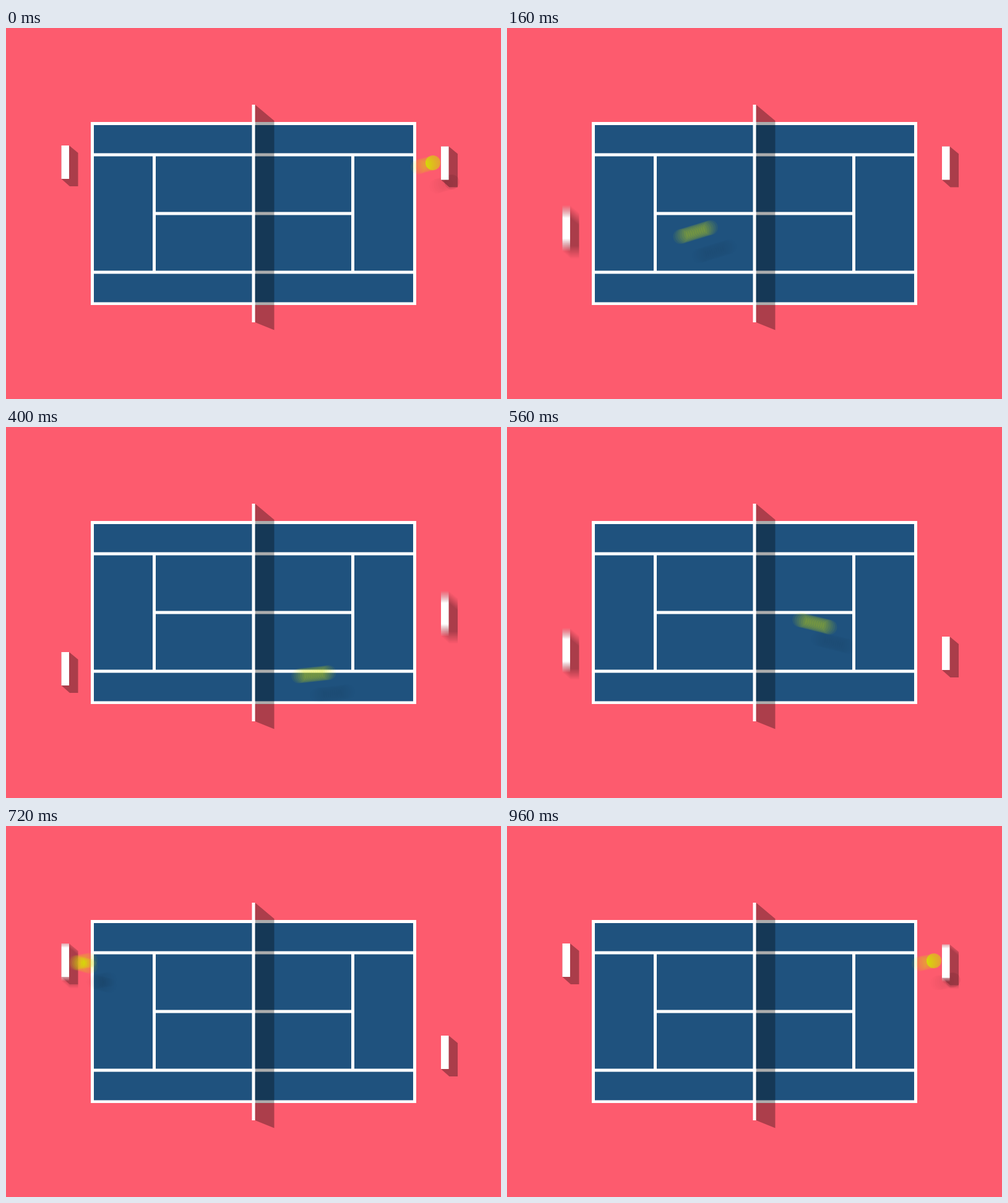
Animation of 800x600 px, one loop 1000 ms. Source, as an HTML page with a canvas:

```html
<!DOCTYPE html>
<html>
<head>
<meta charset="utf-8">
<style>
  html, body { margin: 0; width: 100%; height: 100%; overflow: hidden; background: #fd5b6e; }
  canvas { display: block; }
</style>
</head>
<body>
<canvas id="stage" width="800" height="600"></canvas>
<script>
const ctx = document.getElementById('stage').getContext('2d');
const layer = document.createElement('canvas');
layer.width = 800;
layer.height = 600;
const lctx = layer.getContext('2d');

const LOOP = 1000, STEP = 40, LEG = 240, END = 960;
const SHUTTER = 20, SAMPLES = 15;
const SHADOW = 0.32, BALL_SHADOW = 0.14;
const RIGHT_X = 690, LEFT_X = 112;

// Ball flights: start y, end y, start slope, end slope
const legs = [
  [218, 390, 160, 184],
  [390, 366, 93, -141],
  [366, 221, -144, -144],
  [221, 218, -110, -130]
];

// Paddles: x, the two resting centres, and [start, end] of each move
const paddles = [
  { x: 89.5, from: 217, to: 391, go: [40, 240], back: [520, 720] },
  { x: 703, from: 218.5, to: 366, go: [300, 480], back: [780, 960] }
];

const clamp = (v, lo, hi) => Math.min(hi, Math.max(lo, v));

function hermite(s, [a, b, m, n]) {
  const s2 = s * s, s3 = s2 * s;
  return a * (2 * s3 - 3 * s2 + 1) + m * (s3 - 2 * s2 + s)
       + b * (3 * s2 - 2 * s3) + n * (s3 - s2);
}

function ballAt(t) {
  const i = Math.min(3, Math.floor(t / LEG));
  const s = t / LEG - i;
  const across = i % 2 ? 1 - s : s;
  return [RIGHT_X + (LEFT_X - RIGHT_X) * across, hermite(s, legs[i])];
}

// Mild ease in and out
function progress(t, [start, end]) {
  const s = clamp((t - start) / (end - start), 0, 1);
  return 0.7 * s + 0.3 * s * s * (3 - 2 * s);
}

const paddleTop = (p, t) =>
  p.from + (p.to - p.from) * (progress(t, p.go) - progress(t, p.back)) - 27;

function poly(c, points) {
  c.beginPath();
  points.forEach(([x, y]) => c.lineTo(x, y));
  c.fill();
}

function disc(c, x, y, r) {
  c.beginPath();
  c.arc(x, y, r, 0, Math.PI * 2);
  c.fill();
}

// Average a moving shape over the shutter time
function blur(time, color, alpha, draw) {
  lctx.globalAlpha = 1;
  lctx.clearRect(0, 0, 800, 600);
  lctx.globalCompositeOperation = 'lighter';
  lctx.globalAlpha = 1 / SAMPLES;
  lctx.fillStyle = color;
  for (let i = 0; i < SAMPLES; i++) {
    const offset = (i / (SAMPLES - 1) - 0.5) * SHUTTER;
    draw(lctx, clamp(time + offset, 0, END));
  }
  ctx.globalAlpha = alpha;
  ctx.drawImage(layer, 0, 0);
  ctx.globalAlpha = 1;
}

function court() {
  const box = (color, x, y, w, h) => {
    ctx.fillStyle = color;
    ctx.fillRect(x, y, w, h);
  };
  const white = '#fff';
  box('#fd5b6e', 0, 0, 800, 600);
  box(white, 137, 152, 526, 296);
  box('#1f527e', 142, 157, 516, 286.5);
  box(white, 142, 202.5, 516, 5);
  box(white, 142, 392.5, 516, 5);
  box(white, 237, 205, 5, 190);
  box(white, 558, 205, 5, 190);
  box(white, 240, 297.5, 320, 5);
  ctx.fillStyle = `rgba(0,0,0,${SHADOW})`;
  poly(ctx, [[402.5, 124], [433.5, 150], [433.5, 488.5], [402.5, 476]]);
  box(white, 397.5, 124, 5, 352);
}

function render(time) {
  court();
  for (const p of paddles) {
    blur(time, '#000', SHADOW, (c, t) => {
      const x = p.x, y = paddleTop(p, t);
      poly(c, [[x, y], [x + 12.5, y], [x + 27, y + 12], [x + 27, y + 66],
               [x + 13.5, y + 66], [x, y + 54]]);
    });
  }
  blur(time, '#000', BALL_SHADOW, (c, t) => {
    const [x, y] = ballAt(t);
    disc(c, x + 30.5, y + 31, 12);
  });
  blur(time, '#d8e100', 1, (c, t) => disc(c, ...ballAt(t), 12));
  for (const p of paddles) {
    blur(time, '#fff', 1, (c, t) => c.fillRect(p.x, paddleTop(p, t), 12.5, 54));
  }
}

const origin = performance.now();
function tick() {
  const t = (performance.now() - origin) % LOOP;
  render(Math.floor(t / STEP) * STEP);
  requestAnimationFrame(tick);
}
tick();
</script>
</body>
</html>
```
